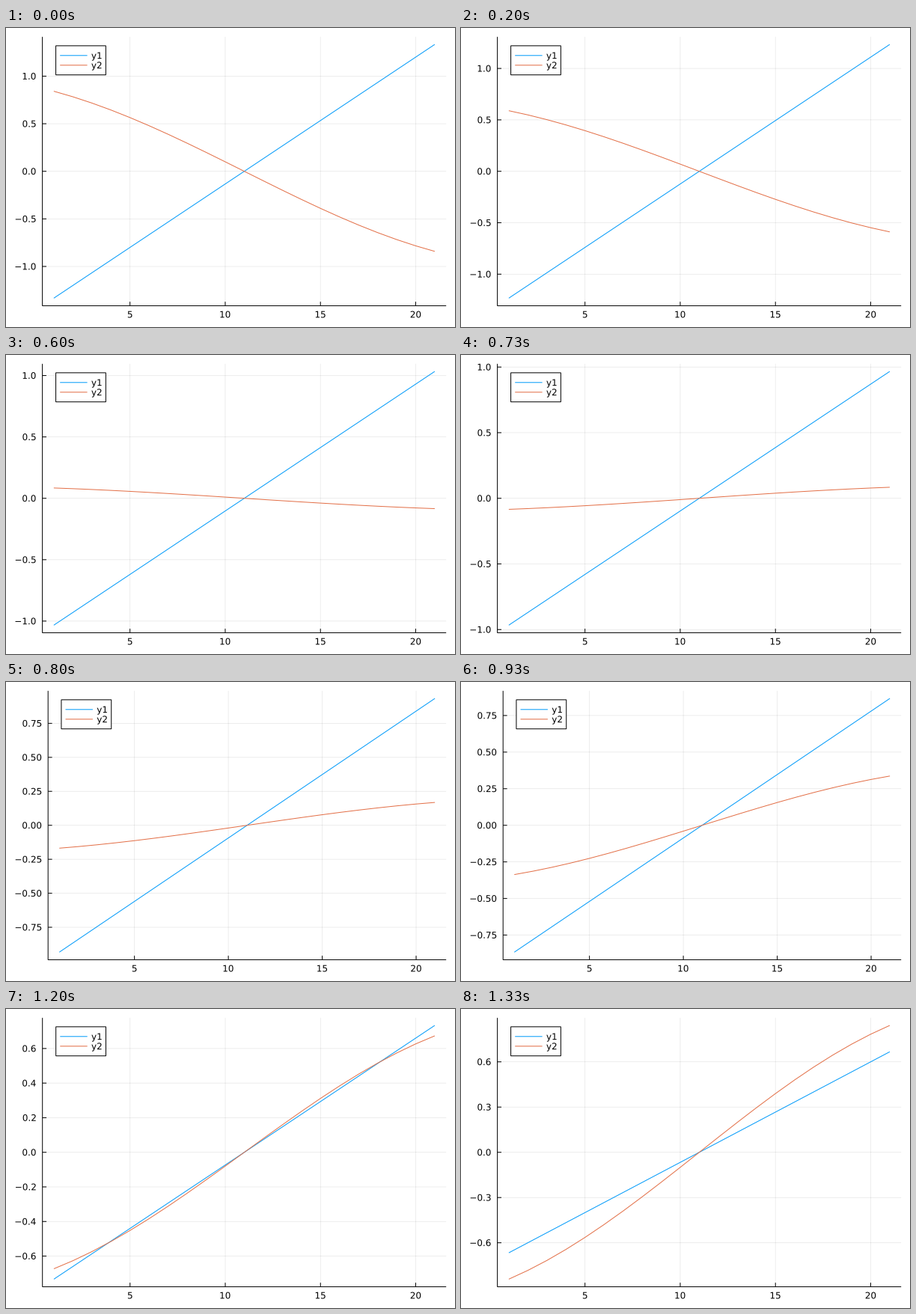
A matplotlib script for the animation above (1.39 s loop, 600 by 400 pixels).

```python
import math

import matplotlib.pyplot as plt
import numpy as np
from matplotlib.animation import FuncAnimation
from matplotlib.patches import PathPatch, Rectangle
from matplotlib.textpath import TextPath
from matplotlib.transforms import Affine2D

plt.rcParams.update({
    "path.snap": False,
    "path.simplify": False,
    "lines.solid_capstyle": "butt",
})

W, H, DPI = 600, 400, 100
PX = 72 / DPI                      # points per pixel
TOP, BOTTOM, RIGHT = 11.81, 371.6, 588.19
MID = (TOP + BOTTOM) / 2
X_MIN, X_MAX = 0.4, 21.6
PAD = 1.06
FONT_SIZE, HALF_CAP = 12, 4.37
TICK = 5.4
BLUE, ORANGE = "#009AFA", "#E36F47"
# left edge of the plot for each tick step, set by the widest label
LEFT = {0.5: 48.6, 0.25: 56.2, 0.3: 48.6, 0.2: 48.7}

N = np.arange(1, 22)
X = np.linspace(-1, 1, 21)

fig = plt.figure(figsize=(W / DPI, H / DPI), dpi=DPI, facecolor="white")
ax = fig.add_axes([0, 0, 1, 1])
ax.set_axis_off()

glyphs = {}


def line(xs, ys, color="black", width=1.0, **kw):
    ax.plot(xs, ys, color=color, lw=width * PX, **kw)


def text(x, y, s, align):
    """Draw s vertically centred on y; align is the share of its width left of x."""
    if s not in glyphs:
        glyphs[s] = TextPath((0, 0), s, size=FONT_SIZE, prop={"family": "DejaVu Sans"})
    path = glyphs[s]
    box = path.get_extents()
    shift = Affine2D().scale(1, -1).translate(
        x - box.x0 - align * box.width, y + HALF_CAP)
    ax.add_patch(PathPatch(shift.transform_path(path), fc="black", lw=0, zorder=5))


def tick_step(limit):
    if limit > 1:
        return 0.5
    if limit > 0.9:
        return 0.25
    return 0.3 if limit > 0.8 else 0.2


def legend(left):
    x, y, row = left + (RIGHT - left) / 30, TOP + 12, 12.97
    ax.add_patch(Rectangle((x, y), 66.8, 3 * row, fc="white", ec="black",
                           lw=PX, zorder=4))
    for i, (name, color) in enumerate((("y1", BLUE), ("y2", ORANGE)), 1):
        line([x + 5.6, x + 42], [y + i * row] * 2, color, zorder=5)
        text(x + 47.7, y + i * row, name, 0)


def draw(tick):
    for artist in [*ax.lines, *ax.patches]:
        artist.remove()
    ax.set_xlim(0, W)
    ax.set_ylim(H, 0)

    k = (6 * tick + 3) // 40       # 15 steps a second on a 10 ms clock
    y1 = X * (4 / 3 - k / 30)
    y2 = np.sin(X) * (k / 10 - 1)
    limit = PAD * max(y1[-1], abs(y2[-1]))
    step = tick_step(limit)
    left = LEFT[step]

    def px(x):
        return left + (x - X_MIN) * (RIGHT - left) / (X_MAX - X_MIN)

    def py(y):
        return MID - y / limit * (BOTTOM - MID)

    x_ticks = range(5, 21, 5)
    count = math.floor(limit / step)
    y_ticks = [i * step for i in range(-count, count + 1)]
    digits = 2 if step == 0.25 else 1

    grid = dict(color="black", width=0.7, alpha=0.1, zorder=1)
    for v in x_ticks:
        line([px(v)] * 2, [TOP, BOTTOM], **grid)
        line([px(v)] * 2, [BOTTOM, BOTTOM - TICK])
        text(px(v), 383.1, str(v), 0.5)
    for v in y_ticks:
        line([left, RIGHT], [py(v)] * 2, **grid)
        line([left, left + TICK], [py(v)] * 2)
        text(left - 9, py(v), f"{v:.{digits}f}".replace("-", "\u2212"), 1)
    line([left, left, RIGHT], [TOP, BOTTOM, BOTTOM], solid_joinstyle="miter")

    line(px(N), py(y1), BLUE, zorder=3)
    line(px(N), py(y2), ORANGE, zorder=3)
    legend(left)
    return []


anim = FuncAnimation(fig, draw, frames=139, interval=10, repeat=True,
                     repeat_delay=0, blit=False)
plt.show()
```
